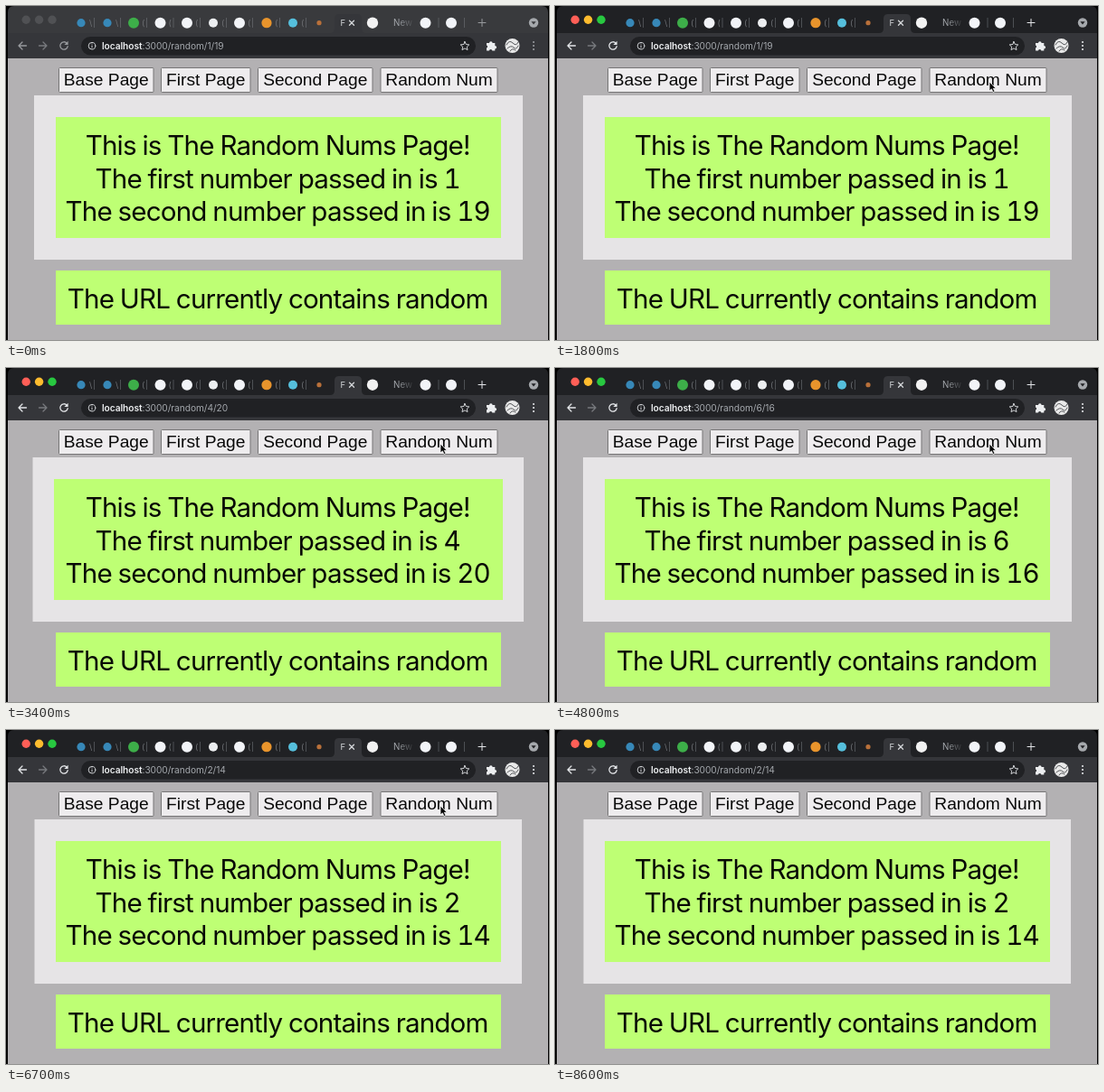
An HTML page for the animation above (8700 ms loop, 600x370 px).

```html
<!DOCTYPE html>
<html lang="en">
<head>
<meta charset="utf-8">
<title>Random nums page</title>
<style>
  html, body { margin: 0; width: 100%; height: 100%; overflow: hidden; background: #000; }
  svg { display: block; width: 600px; height: 370px; }
  text { white-space: pre; }
  .ui, .big { font-family: Inter, "Open Sans", sans-serif; font-optical-sizing: none; }
  .big { font-size: 29.6px; letter-spacing: -.86px; word-spacing: -.3px; font-variant-numeric: tabular-nums; text-anchor: middle; fill: #080a06; }
  .button { font: 19.2px "Liberation Sans", Arial, sans-serif; text-anchor: middle; fill: #080808; }
  .line { fill: none; stroke-width: 1.3; stroke-linecap: round; stroke-linejoin: round; }
  #chrome { --strip: #202124; --icon: #e2e4e7; --title: #a4a8ad; --sep: #4d5054; }
  #chrome.idle { --strip: #393a3d; --icon: #97999d; --title: #94979b; --sep: #5a5c60; }
  .strip { fill: var(--strip); }
  .icon { fill: var(--icon); }
  .line.icon { fill: none; stroke: var(--icon); }
  .thin { stroke-width: 1; }
  .title { fill: var(--title); }
  .sep { stroke: var(--sep); }
</style>
</head>
<body>
<svg id="stage" viewBox="0 0 600 370">
  <defs>
    <linearGradient id="fade"><stop offset=".2" stop-color="#a4a8ad"/><stop offset="1" stop-color="#a4a8ad" stop-opacity=".15"/></linearGradient>
  </defs>
  <rect width="600" height="370"/>

  <g id="chrome">
    <path class="strip" d="M2 58V7Q2 0 9 0H592Q599 0 599 7V58Z"/>
    <g id="lights"></g>
    <g id="tabs"></g>
    <path fill="#35363a" d="M2 30H358Q363 30 363 25V14Q363 9 368 9H388Q393 9 393 14V25Q393 30 398 30H599V58H2Z"/>
    <text class="ui" x="369.5" y="22" font-size="9.4" fill="#d4d6d9">F</text>
    <path class="line" stroke="#d4d6d9" d="M379.5 16.2l5 5m0-5l-5 5"/>
    <text class="ui" x="428" y="22" font-size="9.8" fill="url(#fade)">New</text>
    <path class="line icon thin" d="M522 18.5h8m-4-4v8"/>
    <circle cx="583" cy="18.5" r="5.2" fill="#a6a9ad"/>
    <path class="strip" d="M580.4 17.2h5.2l-2.6 3.3z"/>

    <path class="line icon" d="M22.5 44h-8.5m4-4l-4 4l4 4"/>
    <path class="line" stroke="#77797d" d="M36.5 44h8.5m-4-4l4 4l-4 4"/>
    <path class="line icon" d="M67.2 41.2a4.2 4.2 0 1 0 1 3.4"/>
    <path class="icon" d="M68.6 38.8v4.2h-4.2z"/>
    <rect x="83" y="34" width="436" height="20.5" rx="10.2" fill="#202124"/>
    <g class="line thin" stroke="#d0d2d5"><circle cx="95" cy="44.2" r="3.8"/><path d="M95 44v2m0-4v.1"/></g>
    <text class="ui" x="106" y="47.8" font-size="10.2" letter-spacing="-.06" fill="#a4a8ad"><tspan fill="#eef0f2" font-weight="600">localhost</tspan><tspan id="path"></tspan></text>
    <path class="line thin" stroke="#cfd1d4" d="M507 39.4l1.4 3.1l3.4.4l-2.5 2.3l.7 3.4l-3-1.7l-3 1.7l.7-3.4l-2.5-2.3l3.4-.4z"/>
    <path fill="#eceef0" d="M531 41h3a1.8 1.8 0 0 1 3.6 0h2.7v3a1.8 1.8 0 0 1 0 3.6v2h-3a1.7 1.7 0 0 0-3.4 0h-2.9v-3a1.7 1.7 0 0 0 0-3.2z"/>
    <circle cx="559.5" cy="44" r="8" fill="#e9e9e9"/>
    <path class="line thin" stroke="#55575a" d="M553 43q3-6 7-2t6-1M554 47q4-4 7-1t5-2M557 50q2-4 6-1"/>
    <g class="icon"><circle cx="583" cy="40" r="1.1"/><circle cx="583" cy="44" r="1.1"/><circle cx="583" cy="48" r="1.1"/></g>
  </g>

  <rect x="2" y="58" width="597" height="312" fill="#b3b1b3"/>
  <g id="buttons"></g>
  <rect id="panel" y="99" height="182" fill="#e6e4e6"/>
  <rect id="card" y="123" height="134" fill="#beff74"/>
  <rect x="55" y="293" width="492" height="60" fill="#beff74"/>
  <text class="big" x="300.2" y="165">This is The Random Nums Page!</text>
  <text class="big" id="first" x="300.2" y="201.7"></text>
  <text class="big" id="second" x="300.2" y="238.3"></text>
  <text class="big" x="300.2" y="335">The URL currently contains random</text>

  <path id="cursor" d="M0 0V10L2.4 7.9L4 11.5L5.9 10.6L4.3 7.3H7.3Z" fill="#050505" stroke="#f4f4f4" stroke-width=".8"/>
</svg>

<script>
const LOOP = 8700, FOCUS_AT = 1300;
const $ = id => document.getElementById(id);

function add(parent, tag, attrs, text) {
  const el = document.createElementNS($("stage").namespaceURI, tag);
  for (const key in attrs) el.setAttribute(key, attrs[key]);
  if (text) el.textContent = text;
  return parent.appendChild(el);
}

const lights = ["#ff5f57", "#febc2e", "#28c840"].map((color, i) => ({
  color, el: add($("lights"), "circle", { cx: 22.2 + i * 14.4, cy: 15.3, r: 4.7 })
}));

// Tab icons: centre, colour, radius
const tabIcons = [
  [83, "#3788b8", 4.6], [112, "#3788b8", 4.6], [141, "#3dae49", 6], [170.5, "#f2f4f8", 6],
  [200, "#f2f4f8", 6], [229, "#eceef0", 5], [258, "#f2f4f8", 6], [288, "#e8942c", 5.6],
  [317, "#55bfdc", 5], [346, "#b9703a", 2.6], [405, "#f2f2f2", 6.2], [463.5, "#f2f4f8", 6], [492, "#f2f4f8", 6]
];
tabIcons.forEach(([cx, fill, r], i) => {
  add($("tabs"), "circle", { cx, cy: 18.7, r, fill });
  if (i < 9 || i > 10) add($("tabs"), "path", { class: "sep", d: `M${cx + 14.5} 13v11` });
  if (i < 9) add($("tabs"), "text", { class: "ui title", x: cx + 9, y: 22, "font-size": 9, opacity: .6 }, i < 2 ? "\\" : "(");
});

[["Base Page", 58, 105.5], ["First Page", 171, 99.5], ["Second Page", 278, 127.5], ["Random Num", 413.5, 130]]
  .forEach(([label, x, width]) => {
    add($("buttons"), "rect", { x: x + .5, y: 68.5, width: width - 1, height: 27, rx: 1, fill: "#eeecee", stroke: "#767576" });
    add($("buttons"), "text", { class: "button", x: x + width / 2, y: 88.3 }, label);
  });

// Each visit: start time, both numbers, panel and card edges
const visits = [
  { at: 0, a: 1, b: 19, panel: [31, 571], card: [55, 547] },
  { at: 2500, a: 4, b: 20, panel: [29.5, 572], card: [53, 549] },
  { at: 4100, a: 6, b: 16, panel: [31, 571], card: [55, 547] },
  { at: 5600, a: 2, b: 14, panel: [31.5, 570], card: [55, 547] }
];

const pointer = [[300, 590, 190], [800, 473, 84.5], [1000, 473, 84.5], [1300, 480, 84], [7700, 480, 84]];

function setSpan(el, [left, right]) {
  el.setAttribute("x", left);
  el.setAttribute("width", right - left);
}

function showVisit({ a, b, panel, card }) {
  $("path").textContent = `:3000/random/${a}/${b}`;
  $("first").textContent = `The first number passed in is ${a}`;
  $("second").textContent = `The second number passed in is ${b}`;
  setSpan($("panel"), panel);
  setSpan($("card"), card);
}

function placePointer(t) {
  const i = pointer.findIndex(([at]) => t < at);
  $("cursor").style.display = i > 0 ? "" : "none";
  if (i < 1) return;
  const [t0, x0, y0] = pointer[i - 1], [t1, x1, y1] = pointer[i];
  const p = (t - t0) / (t1 - t0), k = 1 - (1 - p) ** 3;
  $("cursor").setAttribute("transform", `translate(${x0 + (x1 - x0) * k} ${y0 + (y1 - y0) * k})`);
}

let shown;
function draw() {
  const t = Math.floor(performance.now() % LOOP / 100) * 100;
  const visit = visits.findLast(v => t >= v.at);
  if (visit !== shown) showVisit(shown = visit);
  const idle = t < FOCUS_AT;
  $("chrome").classList.toggle("idle", idle);
  lights.forEach(({ el, color }) => el.setAttribute("fill", idle ? "#505154" : color));
  placePointer(t);
  requestAnimationFrame(draw);
}
draw();
</script>
</body>
</html>
```
